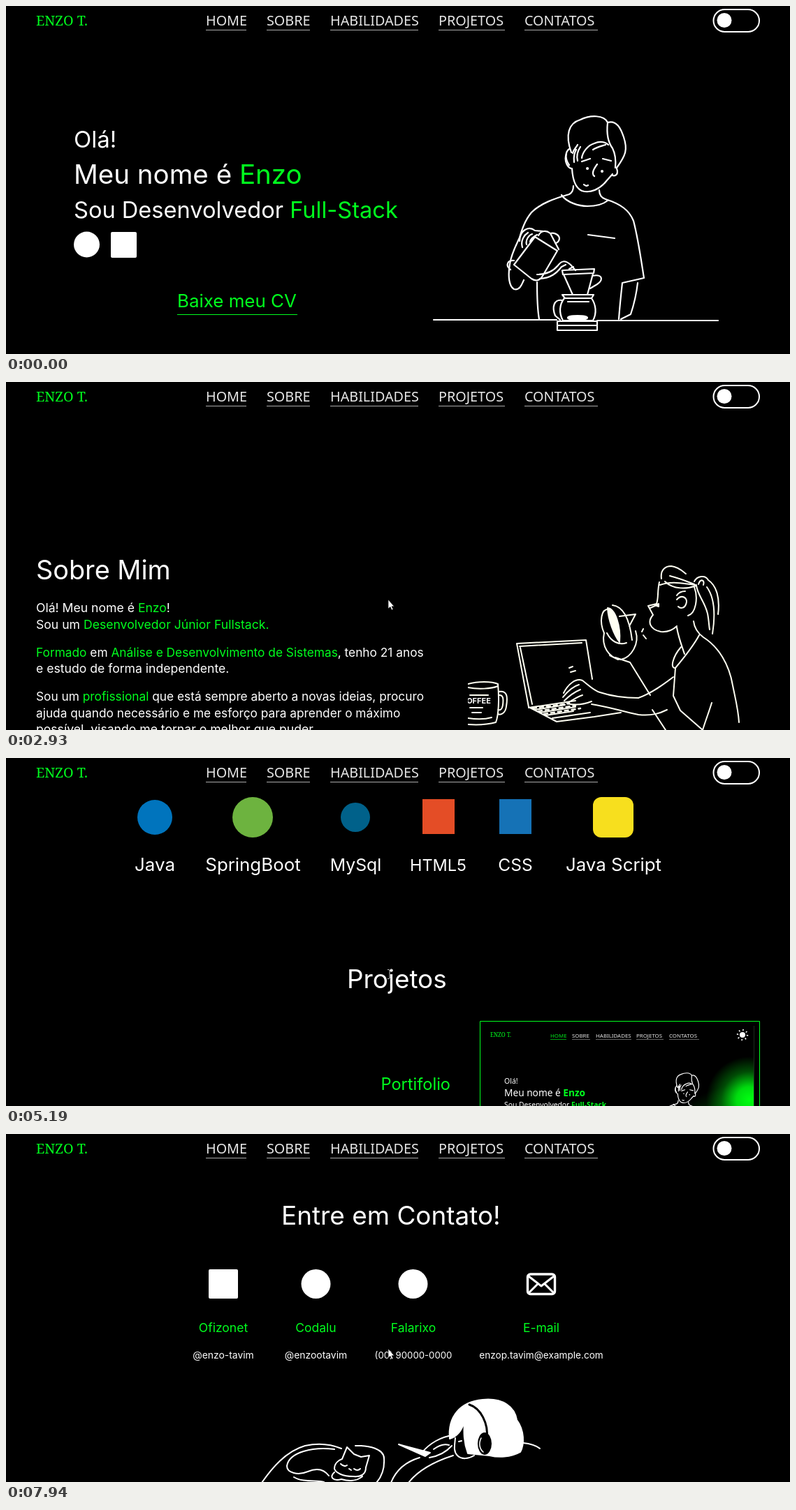
An HTML page for the animation above (8000 ms loop, 1122 by 499 pixels).

```html
<!DOCTYPE html>
<html lang="pt">
<head>
<meta charset="utf-8">
<title>Portifolio</title>
<style>
html, body { margin: 0; width: 100%; height: 100%; overflow: hidden; background: #000; }
svg { display: block; }
text { font-family: Inter, "Open Sans", sans-serif; font-optical-sizing: none; fill: #fff; }
.noto, .noto text { font-family: "Noto Sans", "Open Sans", sans-serif; }
.brand { font-family: "Noto Serif", serif; }
.g { fill: #00ff1e; }
.b { font-weight: 700; }
.mid text, .mid { text-anchor: middle; }
.end { text-anchor: end; }
.ink { fill: none; stroke: #fff; stroke-width: 2.2; stroke-linecap: round; stroke-linejoin: round; }
.w { fill: #fff; }
.rule { fill: none; stroke: #00ff1e; }
</style>
</head>
<body>
<svg width="1122" height="499" viewBox="0 0 1122 499">
<defs>
  <radialGradient id="glow">
    <stop offset="0" stop-color="#0f1"/>
    <stop offset=".3" stop-color="#0f1" stop-opacity=".85"/>
    <stop offset=".65" stop-color="#0f1" stop-opacity=".3"/>
    <stop offset="1" stop-color="#0f1" stop-opacity="0"/>
  </radialGradient>
  <clipPath id="shot"><rect x="685" y="1" width="386" height="249"/></clipPath>
  <clipPath id="desk"><rect x="661" y="250" width="420" height="260"/></clipPath>

  <g id="barista">
    <!-- head -->
    <path d="M809 210C800 185 805 168 822 163C836 156 856 156 861 167C874 163 880 176 884 188C890 206 887 214 874 232M861 167C859 185 862 196 868 204C872 212 873 222 872 232"/>
    <path d="M806 205C799 210 801 221 806 228M811 211C812 206 816 203 818 199M813 224C812 214 814 210 816 206M818 222C816 214 818 208 822 202M824 218C825 210 832 200 842 197C850 193 858 195 862 199M840 206C846 202 852 201 858 199"/>
    <path d="M802 212C798 222 804 233 810 233C811 250 815 261 824 265C836 269 850 263 860 250L868 241M874 233C877 242 872 244 868 243M824 223L836 219M854 219L866 222M846 227C840 235 838 241 842 244M827 256Q830 259 833 257"/>
    <path d="M832 233h.1M853 237h.1" stroke-width="4"/>
    <!-- body -->
    <path d="M812 258C812 264 810 268 806 270C785 276 765 283 752 296C742 308 738 322 735 332C729 345 723 356 721 370C718 388 720 402 727 406C735 408 738 400 741 393M849 264C849 271 852 275 858 277C880 284 892 293 898 308C905 335 909 365 913 390L882 397C880 415 878 435 877 449M904 397C902 415 898 430 894 442L880 449M795 271C803 282 820 287 832 287C845 287 855 284 861 279M833 328L871 333M760 396C760 415 760 432 763 449"/>
    <!-- kettle -->
    <path d="M757 331L789 351L768 387C764 394 758 395 752 391L727 371ZM762 329C766 321 774 322 779 326L791 349M779 326C784 325 791 327 792 333C792 337 789 340 786 340M727 365C718 364 714 372 722 378M735 337C735 323 747 314 757 322L769 323M739 346C736 336 742 328 747 325M745 342C743 335 749 328 753 327M750 338C751 333 756 330 760 328"/>
    <path d="M760 385C775 385 785 378 790 372C796 364 801 365 808 371L815 379M764 391C780 390 788 383 795 374L801 371M806 377L812 374"/>
    <!-- dripper and carafe -->
    <path d="M796 379L842 377L841 383L797 385ZM798 385L811 414H832L840 384M839 387C853 384 856 392 846 399L836 405M796 414H841L838 419H800ZM799 419C792 428 791 440 797 451H840C846 440 844 428 838 419M796 422C784 420 781 432 786 444L793 450M804 424H834M789 452H846V465H789ZM790 458H845"/>
    <ellipse cx="818" cy="447" rx="14" ry="3" fill="#fff"/>
    <path d="M612 450H788M846 451H1019"/>
  </g>

  <!-- plain swatches for the tech row, 58 px tall, centred on 0 -->
  <circle id="java" r="25" fill="#0074bd"/>
  <circle id="spring" r="29" fill="#6db33f"/>
  <circle id="mysql" r="21" fill="#00618a"/>
  <rect id="html" x="-23" y="-25" width="46" height="50" fill="#e44d26"/>
  <rect id="css" x="-23" y="-25" width="46" height="50" fill="#1572b6"/>
  <rect id="js" x="-29" y="-29" width="58" height="58" rx="12" fill="#f7df1e"/>
</defs>

<rect width="1122" height="499"/>
<g id="page">
  <!-- home -->
  <g>
    <text x="97" y="203" font-size="33">Olá!</text>
    <text x="97" y="255" font-size="38.5">Meu nome é <tspan class="g">Enzo</tspan></text>
    <text x="97" y="304" font-size="32.6">Sou Desenvolvedor <tspan class="g">Full-Stack</tspan></text>
    <circle class="w" cx="115.500" cy="342" r="18.500"/>
    <rect class="w" x="150" y="324" width="37" height="37" rx="2"/>
    <text class="g" x="245" y="432" font-size="25.9">Baixe meu CV</text>
    <path class="rule" d="M245 442.500H417"/>
    <use href="#barista" class="ink"/>
  </g>

  <!-- about -->
  <g transform="translate(0 450)">
    <text x="43" y="283" font-size="37.8">Sobre Mim</text>
    <g font-size="17.6">
      <text x="43" y="330">Olá! Meu nome é <tspan class="g">Enzo</tspan>!</text>
      <text x="43" y="354">Sou um <tspan class="g">Desenvolvedor Júnior Fullstack.</tspan></text>
      <text x="43" y="394" font-size="17.3"><tspan class="g">Formado</tspan> em <tspan class="g">Análise e Desenvolvimento de Sistemas</tspan>, tenho 21 anos</text>
      <text x="43" y="417">e estudo de forma independente.</text>
      <text x="43" y="457" font-size="17.3">Sou um <tspan class="g">profissional</tspan> que está sempre aberto a novas ideias, procuro</text>
      <text x="43" y="481" font-size="17.3">ajuda quando necessário e me esforço para aprender o máximo</text>
      <text x="43" y="504">possível, visando me tornar o melhor que puder.</text>
    </g>
    <g class="ink" clip-path="url(#desk)" style="stroke:#fffff2;stroke-width:2">
      <!-- mug -->
      <path d="M661 433C675 429 695 429 704 433C706 455 705 478 701 488C690 491 675 492 661 491M661 438C675 441 695 440 704 436M705 444C718 442 718 452 716 465C715 475 708 478 704 476M705 449C712 448 712 455 711 463C710 470 707 471 704 470M664 449H690M664 467H682M667 474H680M661 482C675 484 685 484 695 481"/>
      <text x="651" y="461" font-size="11" class="b" stroke="none">COFFEE</text>
      <!-- laptop -->
      <path d="M731 375L830 370L839 426M731 375L748 466L788 487L842 480L880 474M735 379L824 374M736 381L753 462M748 467L815 457M806 410L811 408M808 416L815 414M757 470L800 463M764 474L815 466M772 478L812 472M782 482L836 474"/>
      <path d="M754 468L806 461M762 472L815 464M770 476L822 468" stroke-dasharray="5 5" stroke-width="2.500"/>
      <!-- typing arm -->
      <path d="M798 446C804 434 815 424 825 428C834 435 842 443 850 445C868 451 885 453 905 453C925 446 943 432 955 423M797 452C805 442 813 436 820 434M799 457C808 448 815 444 822 441M803 461C812 455 818 451 825 449M803 461C815 464 828 462 838 458M838 462C860 465 880 472 905 477C925 479 936 475 946 470"/>
      <!-- sandwich hand -->
      <path d="M864 326C851 324 849 344 856 360C852 378 862 396 880 398C895 395 907 375 901 357M868 320C885 322 893 345 896 370M860 360C866 372 877 378 888 374M878 336L901 333L892 350M864 392L876 398M872 395L893 402L922 449M912 354L910 358M912 363L916 368"/>
      <path d="M861 324C872 325 880 350 878 373C870 362 862 342 861 324Z" fill="#fffff2"/>
      <!-- head -->
      <path d="M935 287C932 300 934 310 931 318L919 321L926 334C917 344 922 355 937 358C948 359 956 354 960 350M922 324L933 319M938 282C936 268 945 264 952 264C962 265 968 271 973 275M936 291C955 284 972 290 988 291M943 286C955 298 975 297 988 292M950 278C962 281 975 286 985 290M985 286C989 278 1001 276 1005 284C1017 292 1022 310 1019 333M1003 294C1016 312 1014 342 1011 361M988 292C990 306 1000 315 1004 332C1006 342 1006 350 1007 355M998 291C1000 284 994 281 991 290M985 294C991 310 987 332 976 335M960 312C967 304 977 309 973 319C970 326 964 324 962 322M972 300C966 300 962 303 960 306"/>
      <path d="M929 320L934 318V322Z" fill="#fffff2"/>
      <!-- shirt -->
      <path d="M960 352C962 365 967 378 971 390M984 343C985 352 990 360 998 366C1020 380 1035 405 1040 435C1044 455 1048 470 1049 488M992 363C983 380 968 398 958 410C950 411 954 394 966 380M958 410L955 450L965 471L997 499C1001 486 1006 473 1010 460M925 470L944 499"/>
    </g>
  </g>

  <!-- skills -->
  <g transform="translate(0 877)">
    <text x="452" y="344" font-size="38.8">Habilidades</text>
    <use href="#java" x="213" y="470"/>
    <use href="#spring" x="353" y="470"/>
    <use href="#mysql" x="500" y="470"/>
    <use href="#html" x="619" y="469"/>
    <use href="#css" x="729" y="469"/>
    <use href="#js" x="869" y="470"/>
    <g class="mid" font-size="25.9">
      <text x="213" y="547">Java</text>
      <text x="353.500" y="547">SpringBoot</text>
      <text x="500.500" y="547" font-size="24.800">MySql</text>
      <text x="618.500" y="547" font-size="23.500">HTML5</text>
      <text x="729" y="547" font-size="24.500">CSS</text>
      <text x="869.500" y="547">Java Script</text>
    </g>
  </g>

  <!-- projects -->
  <g transform="translate(0 1645)">
    <text x="488" y="-53" font-size="36.900">Projetos</text>
    <text class="g end" x="636" y="93" font-size="23.600">Portifolio</text>
    <g class="end" font-size="14.100">
      <text x="636" y="136">Portifolio desenvolvido para apresentação profissional e de principais projetos que o</text>
      <text x="636" y="160">desenvolvedor fez durante sua carreira.</text>
    </g>
    <path class="rule" d="M678.500 -5.500H1078.500V257.500H678.500Z"/>
    <g clip-path="url(#shot)" class="noto">
      <circle cx="1064" cy="107" r="62" fill="url(#glow)"/>
      <circle cx="1068" cy="242" r="160" fill="url(#glow)"/>
      <circle cx="692" cy="245" r="34" fill="url(#glow)"/>
      <path d="M685 250H1071V1" fill="none" stroke="#1c2a1c" stroke-width="2"/>
      <text class="g" x="693" y="17" font-size="8" style="font-family:'Noto Serif',serif">ENZO T.</text>
      <g id="mininav" font-size="7.900"></g>
      <circle class="w" cx="1054" cy="14" r="4"/>
      <circle cx="1054" cy="14" r="7" fill="none" stroke="#fff" stroke-width="2.400" stroke-dasharray="1.500 3.998"/>
      <text x="713" y="84" font-size="10.500">Olá!</text>
      <text x="713" y="102" font-size="13.700">Meu nome é <tspan class="g b">Enzo</tspan></text>
      <text x="713" y="118" font-size="10.300">Sou Desenvolvedor <tspan class="g b">Full-Stack</tspan></text>
      <circle class="w" cx="721" cy="135" r="7.500"/>
      <rect class="w" x="737" y="127.500" width="15" height="15" rx="1"/>
      <text class="g b" x="739" y="173" font-size="10.800">Baixe meu CV</text>
      <path class="rule" d="M737 178H815"/>
      <use href="#barista" class="ink" style="stroke-width:3" transform="translate(641.300 6.250) scale(.395)"/>
    </g>
    <g id="chips"></g>
    <path class="rule" d="M43 323H1079" stroke-width="2"/>
  </g>

  <!-- contact -->
  <g transform="translate(0 1971)">
    <text x="394" y="130" font-size="36.900">Entre em Contato!</text>
    <rect class="w" x="290" y="194" width="42" height="42" rx="2"/>
    <circle class="w" cx="443.500" cy="215" r="21"/>
    <circle class="w" cx="582.500" cy="215" r="21"/>
    <g class="ink" style="stroke-width:3.400">
      <rect x="746.500" y="201" width="39" height="28.500" rx="4"/>
      <path d="M748 204L766 218L784 204M748 228L761 215M784 228L771 215" stroke-width="3"/>
    </g>
    <g class="mid" font-size="17.500">
      <text class="g" x="311" y="284">Ofizonet</text>
      <text class="g" x="443.500" y="284">Codalu</text>
      <text class="g" x="583" y="284">Falarixo</text>
      <text class="g" x="766" y="284">E-mail</text>
    </g>
    <g class="mid" font-size="13.900">
      <text x="311" y="322">@enzo-tavim</text>
      <text x="443.500" y="322">@enzootavim</text>
      <text x="583" y="322" font-size="13.200">(00) 90000-0000</text>
      <text x="766" y="322" font-size="13.600">enzop.tavim@example.com</text>
    </g>
    <g class="ink" style="stroke-width:2">
      <!-- cat on the cushion -->
      <path d="M366 500C380 480 400 455 428 447C450 442 468 446 480 451M500 447C520 446 541 452 541 465C542 480 537 492 530 500M470 452C440 448 405 456 402 476C402 486 418 490 432 484C446 478 456 482 462 490M481 466L488 449L498 459L508 463L520 461L515 478C515 488 508 492 497 491C482 491 472 486 470 480C470 473 475 468 481 466M470 485C462 492 468 498 480 495C490 498 502 498 510 491M412 492C425 500 445 496 455 499M479 473Q484 478 488 475M498 480Q503 484 507 480M491 480L494 482"/>
      <!-- reader -->
      <path d="M551 500C558 482 572 470 592 464M576 500C590 482 612 470 640 461M596 456C606 444 622 434 640 432M612 452C620 446 628 444 634 446M606 464C618 462 630 456 638 447M643 436C642 447 640 455 646 461C652 467 662 466 670 461M648 441L652 440M740 443C750 444 759 447 764 451"/>
      <path d="M562 445L600 462L607 457L569 447Z" fill="#fff"/>
      <path d="M635 437C632 405 650 384 682 381C712 378 728 392 731 410C742 425 742 445 736 456C722 464 704 464 692 461L661 458C655 442 655 428 656 412C652 427 645 434 635 437Z" fill="#fff"/>
      <path d="M663 388C679 393 691 415 688 437" stroke="#000" stroke-width="3"/>
      <ellipse cx="685" cy="444" rx="9" ry="15" fill="#000" stroke="#000"/>
      <path d="M680 436C676 444 678 452 683 456" stroke-width="1.500"/>
    </g>
  </g>
</g>

<!-- header -->
<rect width="1122" height="46"/>
<text class="g brand" x="43" y="28" font-size="19.700">ENZO T.</text>
<g id="nav" class="noto" font-size="19.800"></g>
<rect class="ink" x="1012.500" y="5" width="65.500" height="32" rx="16" style="stroke-width:2"/>
<circle class="w" cx="1028" cy="20.500" r="10.500"/>

<g id="arrow"><path d="M0 0V13L3 10.500L5 15L7 14L5 9.800H8.500Z" fill="#fff" stroke="#000" stroke-width=".6"/></g>
<g id="beam"><path d="M-3 -6.500H-1L0 -5.500L1 -6.500H3M0 -5.500V5.500M-3 6.500H-1L0 5.500L1 6.500H3" fill="none" stroke="#ccc"/></g>
</svg>

<script>
const LOOP = 8000;
const $ = id => document.getElementById(id);

// first change, last change, number of changes
const bursts = [
  [70, 380, 5], [580, 1260, 9], [1590, 2370, 12], [2440, 3000, 9],
  [3260, 4020, 11], [4090, 4360, 5], [4560, 5330, 12], [5400, 5470, 2],
  [6000, 6770, 12], [6840, 7260, 7], [7460, 7460, 1], [7730, 7940, 4]
];
// time, scroll offset
const scrollKeys = [
  [1520, 0], [1590, 12], [1732, 79], [2370, 255], [2860, 438], [2930, 450], [3000, 452],
  [3190, 452], [3260, 460], [4020, 820], [4230, 877], [4360, 882],
  [4490, 882], [4560, 892], [5190, 1262], [5330, 1283], [5470, 1287],
  [5930, 1287], [6000, 1297], [6700, 1645], [6980, 1785], [7260, 1871],
  [7660, 1871], [7730, 1888], [7870, 1955], [7940, 1971]
];
// time, x, y
const pointerKeys = [
  [70, 773, 445], [380, 593, 320], [510, 593, 320], [720, 548, 314], [920, 528, 300],
  [1260, 543, 312], [2370, 543, 312], [2440, 547, 312], [3000, 547, 312],
  [3260, 548, 312], [4360, 548, 312], [4560, 549, 310], [5470, 549, 310],
  [6000, 548, 310], [7260, 548, 310], [7460, 547, 308]
];

// hold time still between the visible steps
function stepTime(t) {
  let out = 0;
  for (const [a, b, n] of bursts) {
    if (t < a) break;
    const gap = n > 1 ? (b - a) / (n - 1) : 1;
    out = a + Math.min(n - 1, Math.floor((t - a) / gap + 0.1)) * gap;
  }
  return out;
}

function sample(keys, t, col) {
  const i = keys.findIndex(k => k[0] > t);
  if (i === 0) return keys[0][col];
  if (i < 0) return keys[keys.length - 1][col];
  const p = keys[i - 1], q = keys[i];
  return p[col] + (q[col] - p[col]) * (t - p[0]) / (q[0] - p[0]);
}

const labels = ["HOME", "SOBRE", "HABILIDADES", "PROJETOS", "CONTATOS"];
const menu = (spans, y, lineY, first) => labels.map((s, i) => {
  const [a, b] = spans[i], hot = first && !i;
  return `<text x="${a}" y="${y}" fill-opacity=".9" class="${hot ? "g" : ""}">${s}</text>` +
    `<path d="M${a} ${lineY}H${b}" stroke="${hot ? "#00ff1e" : "#aaa"}" stroke-width="${first ? 0.6 : 1}"/>`;
}).join("");
$("nav").innerHTML = menu([[286, 344], [373, 435], [464, 590], [619, 714], [742, 847]], 28, 34.5, false);
$("mininav").innerHTML = menu([[779, 802], [810, 836], [844, 895], [902, 941], [949, 992]], 17.5, 20.5, true);
$("chips").innerHTML = ["java", "spring", "mysql", "html", "css", "js"].map((id, i) =>
  `<use href="#${id}" transform="translate(${478 + i * 33.3} 287) scale(.43)"/>`).join("");

function draw(now) {
  const t = stepTime(now % LOOP);
  $("page").setAttribute("transform", `translate(0 ${-Math.round(sample(scrollKeys, t, 1))})`);
  const isBeam = (t >= 1250 && t < 2440) || (t >= 3260 && t < 7460);
  const at = `translate(${Math.round(sample(pointerKeys, t, 1))} ${Math.round(sample(pointerKeys, t, 2))})`;
  for (const id of ["arrow", "beam"]) {
    const shown = t >= 70 && (id === "beam") === isBeam;
    $(id).setAttribute("transform", at);
    $(id).setAttribute("visibility", shown ? "visible" : "hidden");
  }
}

const start = performance.now();
function tick() {
  draw(performance.now() - start);
  requestAnimationFrame(tick);
}
tick();
</script>
</body>
</html>
```
